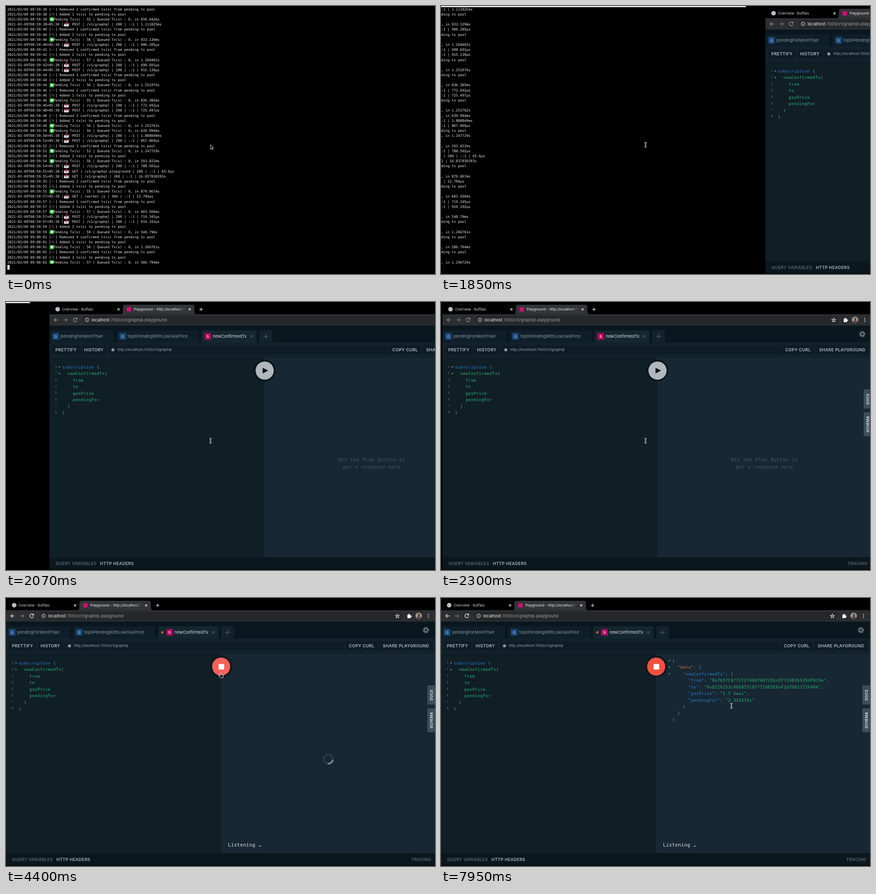
An HTML page for the animation above (8000 ms loop, 947 by 592 pixels).

```html
<!DOCTYPE html>
<html lang="en">
<head>
<meta charset="utf-8">
<title>Pending pool subscription</title>
<style>
html, body { margin: 0; width: 100%; height: 100%; overflow: hidden; background: #000; }
svg { display: block; width: 947px; height: 592px; }
text { font-family: Inter, "Liberation Sans", sans-serif; white-space: pre; }
.mono, .code { font-family: "DejaVu Sans Mono", "Noto Sans Mono", monospace; }
.code { letter-spacing: .33px; }
.btn { font-weight: 600; letter-spacing: .35px; }
.mid { text-anchor: middle; }
.line { fill: none; stroke-width: 1.2; }
</style>
</head>
<body>
<svg id="stage" viewBox="0 0 947 592"></svg>
<script>
const stage = document.getElementById('stage');

function add(parent, tag, attrs = {}, text) {
  const el = document.createElementNS('http://www.w3.org/2000/svg', tag);
  for (const k in attrs) el.setAttribute(k, attrs[k]);
  if (text != null) el.textContent = text;
  parent.appendChild(el);
  return el;
}
const group = parent => add(parent, 'g');
const rect = (p, x, y, width, height, fill, rx = 0) => add(p, 'rect', { x, y, width, height, fill, rx });
const circle = (p, cx, cy, r, fill) => add(p, 'circle', { cx, cy, r, fill });
const path = (p, d, fill, more) => add(p, 'path', { d, fill, ...more });
const line = (p, d, stroke, more) => add(p, 'path', { d, stroke, class: 'line', ...more });
// y is the middle of the capital letters
const label = (p, x, y, size, fill, str, cls = '') =>
  add(p, 'text', { x, y: y + size * .36, 'font-size': size, fill, class: cls }, str);
const show = (el, on) => el.setAttribute('visibility', on ? 'visible' : 'hidden');
const move = (el, x, y) => el.setAttribute('transform', `translate(${x} ${y})`);

// ---- terminal ----
const CELL = 4.605, ROW = 11.18;
const log = `59:38 -2;59:38 +1;59:38 55 836.642ms;59:38 POST 1.111825ms
59:40 -1;59:40 +2;59:40 56 933.139ms;59:40 POST 906.285µs
59:42 -1;59:42 +2;59:42 57 1.260402s;59:42 POST 698.601µs
59:44 POST 915.139µs;59:44 -3;59:44 +2;59:44 56 1.251976s
59:46 -2;59:46 +1;59:46 55 836.385ms;59:46 POST 772.692µs
59:48 POST 725.497µs;59:48 -2;59:48 +3;59:48 56 1.253762s
59:50 56 639.994ms;59:50 POST 1.888849ms
59:52 POST 867.069µs;59:52 -3;59:52 53 1.247729s
59:54 +3;59:54 56 293.022ms;59:54 POST 788.502µs
59:55 GET 65.6µs /v1/graphql-playground;59:55 GET 16.837830393s
59:55 -2;59:55 +1;59:55 55 879.067ms;59:57 GET 22.784µs /worker.js 404
59:57 -1;59:57 +3;59:57 57 603.566ms;59:57 POST 719.345µs;59:57 POST 916.192µs
59:59 +2;59:59 59 548.79ms;00:01 -4;00:01 +1;00:01 56 1.266761s
00:02 -2;00:02 +3;00:02 57 586.794ms;00:04 -2;00:04 +2;00:04 57 1.299724s`.split(/[;\n]/);

const term = group(stage), rows = group(term);
const cell = col => 3 + col * CELL;

log.forEach((entry, i) => {
  const [time, kind, took, route = '/v1/graphql', status = 200] = entry.split(' ');
  const y = 7 + i * ROW, hour = time < '59' ? '09' : '08';
  const put = (col, str) => label(rows, cell(col), y, 7.65, '#ececec', str, 'mono');
  if (/[A-Z]/.test(kind)) {
    put(0, `2021-03-09T${hour}:${time}+05:30 [`);
    put(29, `] ${kind} | ${route} | ${status} | ::1 | ${took}`);
    rect(rows, 128, y - 1.5, 10, 6, '#d9dde2', 1);
    line(rows, `M128.5 ${y - 1}l4.5 3 4.5-3`, '#a5adb5', { 'stroke-width': .7 });
    path(rows, `M132-5h2v3h2l-3 3-3-3h2z`, '#d93a36', { transform: `translate(0 ${y})` });
    return;
  }
  put(0, `2021/03/09 ${hour}:${time} `);
  if (took) {
    rect(rows, 96, y - 4.5, 10, 9.5, '#25b32b', 2);
    line(rows, `M101 ${y - 3}v6M98 ${y}h6M99 ${y - 2}l4 4m0-4l-4 4`, '#fff', { 'stroke-width': .9 });
    put(22, `Pending Tx(s) : ${kind} | Queued Tx(s) : 0, in ${took}`);
  } else {
    const n = kind[1], minus = kind[0] === '-';
    put(20, '[');
    put(23, minus ? `] Removed ${n} confirmed tx(s) from pending tx pool`
                  : `] Added ${n} tx(s) to pending tx pool`);
    line(rows, `M100 ${y}h8` + (minus ? '' : `m-4-4v8`), '#4c4f52');
  }
});
rect(term, 0, 569.5, 947, 22.5, '#000');
rect(term, 3, 572, 5, 10.5, '#e6e6e6');
const topEdge = rect(term, 0, 0, 947, 2.5, '#f4f4f4');

// ---- browser frame ----
const web = group(stage);
rect(web, 0, 0, 947, 592, '#000');
rect(web, 0, 27, 947, 25, '#2d2e31');
path(web, 'M157 27q5 0 5-5V11q0-5 5-5H315q5 0 5 5V22q0 5 5 5z', '#323336');
circle(web, 18, 16, 5, '#b9bdc1');
rect(web, 170.5, 11.5, 9.5, 9.5, '#cf0f70', 1);
label(web, 28, 16.3, 7.9, '#cfd1d4', 'Overview · Buffalo');
label(web, 186, 16.3, 7.9, '#e8eaed', 'Playground - http://localhost:7');
const fade = add(add(web, 'defs'), 'linearGradient', { id: 'fade' });
add(fade, 'stop', { 'stop-color': '#323336', 'stop-opacity': 0 });
add(fade, 'stop', { offset: 1, 'stop-color': '#323336' });
rect(web, 284, 9, 18, 15, 'url(#fade)');
for (const x of [152.5, 309.5])
  line(web, `M${x - 2.3} 14l4.6 4.6m0-4.6l-4.6 4.6`, '#e3e5e8');
line(web, 'M331 16.3h7.4m-3.7-3.7v7.4', '#e3e5e8');

rect(web, 72, 30.5, 804, 18.5, '#262729', 9.2);
const nav = group(web);
line(nav, 'M19 39.6h-8.5m4-4l-4 4 4 4', '#f1f3f4');
line(web, 'M31 39.6h8.5m-4-4l4 4-4 4', '#7d8084');
line(nav, 'M60.3 37a4.2 4.2 0 1 0 .5 3.8M61 34.8v3h-3', '#f1f3f4');
line(web, 'M87 39.6a4 4 0 1 0-8 0a4 4 0 1 0 8 0M83 39v2.7M83 37v1', '#c4c7ca', { 'stroke-width': 1 });
const address = label(web, 93, 39.7, 9.2, '#9aa0a6', '');
add(address, 'tspan', { fill: '#f1f3f4' }, 'localhost');
add(address, 'tspan', {}, ':7000/v1/graphql-playground');
const star = Array.from({ length: 10 }, (_, i) => {
  const a = i * Math.PI / 5, r = i % 2 ? 1.9 : 4.5;
  return `${864 + r * Math.sin(a)} ${40 - r * Math.cos(a)}`;
}).join('L');
line(web, `M${star}z`, '#d5d8db', { 'stroke-width': .9 });
rect(web, 886, 37, 7.5, 7.5, '#f1f3f4', 1);
circle(web, 889.5, 36.6, 1.6, '#f1f3f4');
circle(web, 893.8, 40.6, 1.6, '#f1f3f4');
circle(web, 911, 39.4, 7, '#a79d96');
circle(web, 911.5, 37.5, 2.7, '#594840');
path(web, 'M906.5 44.3q0-4 4.8-4t4.8 4q-4.8 3.6-9.6 0z', '#594840');
for (const y of [36, 39.5, 43]) circle(web, 932.5, y, 1, '#f1f3f4');

// ---- playground page ----
rect(web, 0, 52, 947, 538.5, '#0a171e');
const badge = (p, x, fill, ink, letter) => {
  rect(p, x - 7.2, 68.5, 14.4, 14.4, fill, 1.5);
  label(p, x, 75.8, 8, ink, letter, 'mid btn');
};
const pageTab = (x, w, title) => {
  rect(web, x, 62.5, w, 27, '#0f1f29', 1.5);
  badge(web, x + 13.5, '#1c4a7c', '#86aed6', 'Q');
  label(web, x + 24.5, 75.8, 9.2, '#89959c', title);
};
pageTab(0, 141, 'pendingForMoreThan');
pageTab(148, 181, 'topXPendingWithLowGasPrice');
const activeTab = rect(web, 336, 62.5, 121, 28, '#14262f', 1.5);
const liveDot = circle(web, 345, 75.8, 2.6, '#ee5545');
const tabBody = group(web);
badge(tabBody, 349.5, '#b5035f', '#fff', 'S');
label(tabBody, 360.5, 75.8, 9.2, '#dde2e5', 'newConfirmedTx');
line(tabBody, 'M443 72.8l6 6m0-6l-6 6', '#52616a');
rect(tabBody, 463, 62.5, 28.5, 27, '#12232d', 1.5);
line(tabBody, 'M472 76h11m-5.5-5.5v11', '#5c6a72', { 'stroke-width': 1.5 });

add(web, 'circle', { cx: 927, cy: 71, r: 3.8, fill: 'none', stroke: '#63717a', 'stroke-width': 3 });
add(web, 'circle', { cx: 927, cy: 71, r: 6.2, fill: 'none', stroke: '#63717a', 'stroke-width': 2, 'stroke-dasharray': '2.4 2.469' });

rect(web, 0, 89.5, 947, 34, '#12222c');
const button = (x, w, title) => {
  rect(web, x, 96, w, 19.5, '#0e1c25', 1.5);
  label(web, x + w / 2, 105.5, 9.2, '#b3bdc3', title, 'btn mid');
};
button(6, 61, 'PRETTIFY');
button(70.5, 55, 'HISTORY');
button(750, 70, 'COPY CURL');
button(824, 118, 'SHARE PLAYGROUND');
rect(web, 129.5, 96, 617, 19.5, '#0e1c25', 1.5);
circle(web, 140, 105.7, 5.2, '#1d2c35');
circle(web, 140, 105.7, 3, '#98a2a8');
label(web, 150, 105.5, 7.9, '#98a3aa', 'http://localhost:7000/v1/graphql');

rect(web, 0, 123, 474, 440.5, '#101e26');
rect(web, 474, 123, 473, 440.5, '#172733');
label(web, 13.5, 577.5, 9.2, '#59676f', 'QUERY VARIABLES', 'btn');
label(web, 111.5, 577.5, 9.2, '#adb7bd', 'HTTP HEADERS', 'btn');
label(web, 894.5, 577.5, 9.2, '#59676f', 'TRACING', 'btn');

// ---- code: k keyword or key, g green, o orange, plain punctuation ----
const INK = { k: '#2a7fd0', g: '#2bb073', o: '#d86f40' };
const PITCH = 14.47, CH = 5.87;
function code(p, x, y, src) {
  src.split('\n').forEach((row, i) => {
    const indent = row.search(/\S/);
    const el = label(p, x + indent * CH, y + i * PITCH, 9.2, '#76838b', '', 'code');
    for (const [, ink, word, plain] of row.trim().matchAll(/([kgo])<(.*?)>|([^<]+?(?=[kgo]<|$))/g))
      add(el, 'tspan', ink ? { fill: INK[ink] } : {}, word || plain);
  });
}
const fold = (p, x, y) => path(p, `M${x - 2} ${y - 1.2}h4l-2 3.4z`, '#7c8990');

code(web, 28, 143.5, `k<subscription> {
  g<newConfirmedTx>{
    g<from>
    g<to>
    g<gasPrice>
    g<pendingFor>
  }
}`);
for (let i = 0; i < 8; i++) label(web, 12.3, 142.5 + i * PITCH, 6.6, '#5e6c75', i + 1, 'mono');
fold(web, 22, 143.5);
fold(web, 22, 158);

const reply = group(web), folds = group(web);
code(reply, 510.5, 138.5, `{
  o<"data">: {
    k<"newConfirmedTx">: {
      k<"from">: g<"0x7b5fC677CF27A807ADf2EbcEF72dB3b935dF6C0a">,
      k<"to">: g<"0xD216153c06E857cD7f72665E0aF1d7D82172F494">,
      k<"gasPrice">: g<"2.5 Gwei">,
      k<"pendingFor">: g<"2.343335s">
    }
  }
}`);
for (let i = 0; i < 3; i++) fold(folds, 504, 138.5 + i * PITCH);

const hint = group(web);
label(hint, 711, 348, 10.6, '#485761', 'Hit the Play Button to', 'code mid');
label(hint, 711, 364, 10.6, '#485761', 'get a response here', 'code mid');
const listening = label(web, 490, 545, 10.6, '#dfe4e7', 'Listening …', 'code');

const spinner = group(web);
add(spinner, 'circle', { cx: 711.5, cy: 356, r: 10, fill: 'none', stroke: '#2c3b46', 'stroke-width': 3.6 });
const arc = line(spinner, 'M7.07-7.07A10 10 0 0 1 7.07 7.07', '#7f8a91', { style: 'stroke-width:3.6' });

for (const [y, h, title] of [[193, 42.5, 'DOCS'], [243.5, 53, 'SCHEMA']]) {
  rect(web, 930, y, 18, h, '#3a4f5b', 1.5);
  const t = label(web, 0, 0, 7.9, '#eef1f3', title, 'btn mid');
  t.setAttribute('transform', `translate(938.8 ${y + h / 2}) rotate(-90)`);
}

circle(web, 475, 151.5, 24, '#0a161d');
const disc = circle(web, 475, 151.5, 20, '#b1b8bd');
const play = path(web, 'M470.5 145.3v12.6l12.3-6.3z', '#0b1319');
const stop = rect(web, 469.3, 145.8, 12.2, 12.2, '#fff', .8);

// ---- pointers, hot spot at 0,0 ----
const pointers = {
  arrow: path(stage, 'M0 0V9.6L2.3 7.6 3.8 11 5.4 10.3 3.9 7H6.8z', '#111', { stroke: '#fff', 'stroke-width': .8 }),
  beam: group(stage),
  hand: path(stage, 'M-1 0q1-1 2 0v3.3l4 1q1 .4.8 1.6l-.8 4H-1.5L-4 6q0-1.6 1.6-.8L-1 6z', '#111', { stroke: '#fff', 'stroke-width': .9 })
};
const beamPath = 'M-2.4-5Q0-5 0-3.8Q0-5 2.4-5M0-3.8V3.8M-2.4 5Q0 5 0 3.8Q0 5 2.4 5M-1.4 1h2.8';
line(pointers.beam, beamPath, '#e8e8e8', { style: 'stroke-width:2' });
line(pointers.beam, beamPath, '#222', { style: 'stroke-width:.6' });

// ---- timeline ----
const STEP = 50, CLICK = 3900, REPLY = 6300;
const trips = [
  [2850, 3650, 474, 166],
  [4750, 5500, 373.5, 325],
  [6650, 7450, 641, 238]
];

function pointerAt(t) {
  let x = 451.5, y = 306.5;
  for (const [from, to, tx, ty] of trips) {
    const u = Math.min(1, Math.max(0, (t - from) / (to - from))), e = u * u * (3 - 2 * u);
    x += (tx - x) * e;
    y += (ty - y) * e;
  }
  return [x, y];
}

// Swipe between the two desktops: a decay that speeds up towards its end
function swipe(t) {
  const s = t - 1800;
  if (s <= 0) return 990;
  if (s >= 550) return 0;
  return 990 * Math.exp(-s * (.00562 + 1.7735e-5 * s - 1.155e-8 * s * s));
}

function draw(t) {
  const x = swipe(t), live = t >= CLICK, done = t >= REPLY;
  move(term, x - 990, 0);
  move(web, x, 0);
  move(rows, 0, t < 800 ? 0 : -3 * ROW);
  show(topEdge, t >= 50);
  nav.setAttribute('opacity', t < 2500 ? .55 : 1);

  const [px, py] = pointerAt(t);
  const over = t > 2850 && Math.hypot(px - 475, py - 151.5) < 21;
  const kind = over ? 'hand' : t < 350 || (t > 4750 && px < 500) ? 'arrow' : 'beam';
  for (const k in pointers) show(pointers[k], k === kind);
  move(pointers[kind], px, py);

  activeTab.setAttribute('width', live ? 133 : 121);
  move(tabBody, live ? 11.5 : 0, 0);
  for (const el of [liveDot, listening, stop]) show(el, live);
  for (const el of [hint, play]) show(el, !live);
  disc.setAttribute('fill', !live ? '#b1b8bd' : over ? '#f4615a' : '#f15140');
  show(spinner, live && !done);
  arc.setAttribute('transform', `translate(711.5 356) rotate(${52 + (t - 4400) * .6})`);
  show(reply, done);
  show(folds, done && px > 490);
}

const start = performance.now();
function tick() {
  const t = (performance.now() - start) % 8000;
  draw(Math.floor(t / STEP) * STEP);
  requestAnimationFrame(tick);
}
tick();
</script>
</body>
</html>
```
